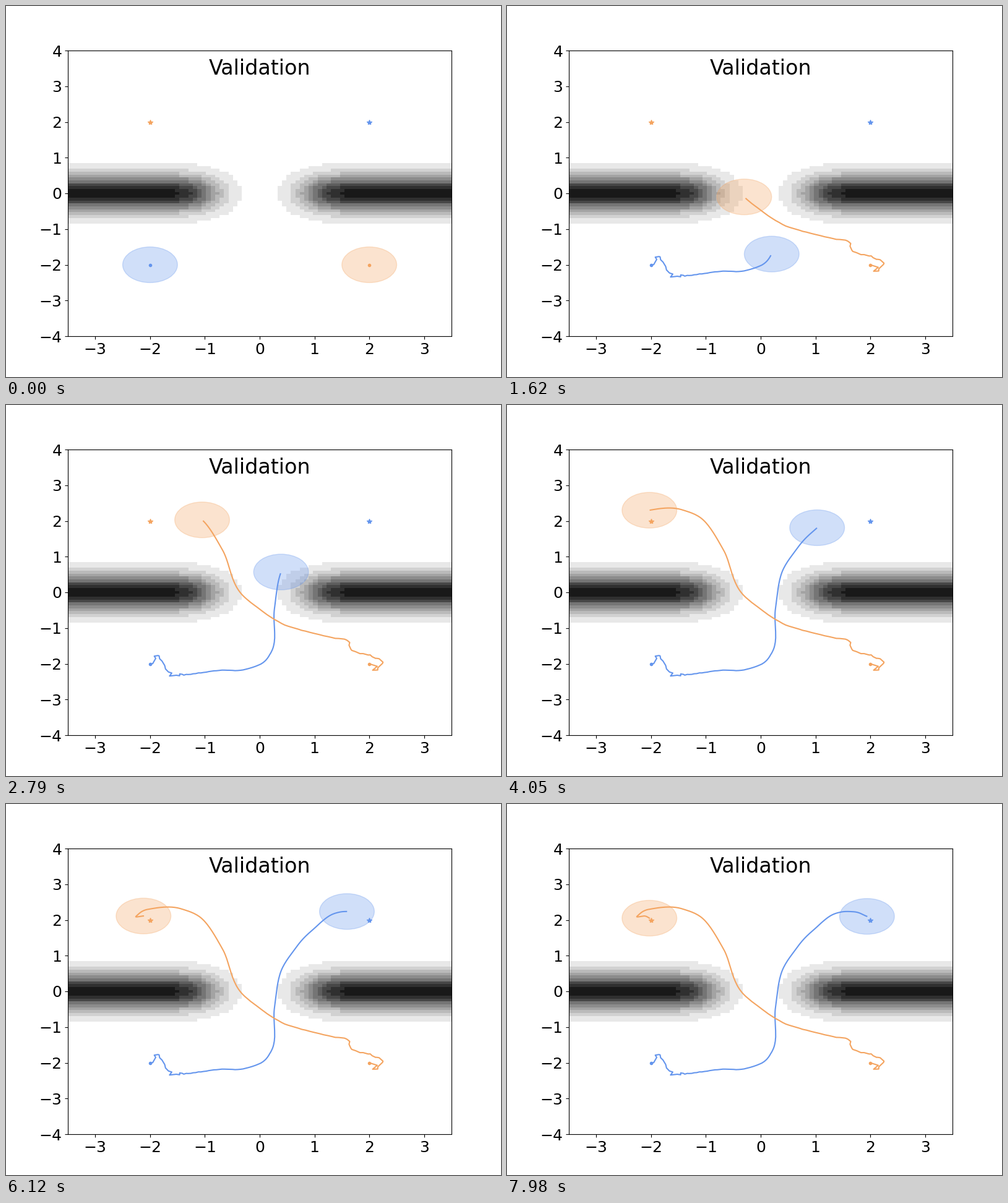
These frames come from a looping animation (800 by 600 pixels, 8 s). A matplotlib script:

```python
import math
import numpy as np
import matplotlib.pyplot as plt
from matplotlib.animation import FuncAnimation
from matplotlib.patches import Circle

LOOP, FRAMES, STEP = 8000, 320, 30
INTERVAL = LOOP // FRAMES
LAST = 266

# Key poses of each agent: (step, x, y).
BLUE = [
    (0, -2, -2), (4, -1.87, -1.78), (11, -1.63, -2.28), (18, -1.38, -2.3),
    (33, -0.69, -2.18), (41, -0.3, -2.17), (48, 0.06, -1.97),
    (54, 0.2, -1.7), (76, 0.27, -0.45), (93, 0.39, 0.57),
    (108, 0.66, 1.22), (135, 1.03, 1.81), (189, 1.46, 2.22),
    (216, 1.69, 2.23), (LAST, 1.94, 2.1),
]
ORANGE = [
    (0, 2, -2), (2, 2.13, -2.18), (6, 2.24, -1.97), (11, 2.01, -1.75),
    (17, 1.66, -1.6), (21, 1.62, -1.36), (27, 1.32, -1.27),
    (33, 0.84, -1.09), (40, 0.4, -0.87), (48, -0.08, -0.38),
    (54, -0.3, -0.1), (76, -0.68, 1.19), (93, -1.05, 2.03),
    (108, -1.43, 2.31), (135, -2.03, 2.3), (162, -2.25, 2.11),
    (204, -2.12, 2.11), (LAST, -2.03, 2.05),
]


def glide(keys):
    """Cubic Hermite path through the key poses, one row per step."""
    keys = np.array(keys, float)
    knots, pos = keys[:, 0], keys[:, 1:]
    slope = np.gradient(pos, knots, axis=0)
    t = np.arange(LAST + 1)
    i = np.clip(np.searchsorted(knots, t, side="right") - 1, 0, len(knots) - 2)
    h = (knots[i + 1] - knots[i])[:, None]
    u = (t - knots[i])[:, None] / h
    return ((1 + 2 * u) * (1 - u) ** 2 * pos[i]
            + u * (1 - u) ** 2 * h * slope[i]
            + u * u * (3 - 2 * u) * pos[i + 1]
            + u * u * (u - 1) * h * slope[i + 1])


def jitter(seed, size=0.05, decay=12):
    """Random shake that dies out; the starting point stays exact."""
    t = np.arange(LAST + 1)[:, None]
    noise = np.random.default_rng(seed).normal(size=(LAST + 1, 2))
    return size * np.sign(t) * np.exp(-t / decay) * noise


def wall_image(cols=86, rows=99, sigma=0.345, edge=0.9):
    """Two soft walls with a gap between them, in eleven greys."""
    x = (np.arange(cols) + 0.5) * 7 / cols - 3.5
    y = (np.arange(rows) + 0.5) * 8 / rows - 4
    along = [0.5 * (1 + math.erf((abs(v) - edge) / sigma / math.sqrt(2)))
             for v in x]
    across = np.exp(-0.5 * (y / sigma) ** 2)
    return 1 - 0.09 * np.round(10 * np.outer(across, along))


class Agent:
    def __init__(self, ax, color, keys, goal, seed):
        self.path = glide(keys) + jitter(seed)
        self.disc = Circle(self.path[0], 0.5, color=color, alpha=0.3)
        ax.add_patch(self.disc)
        ax.plot(*self.path[0], ".", color=color, ms=6)
        ax.plot(*goal, "*", color=color, ms=6)
        self.trail, = ax.plot([], [], color=color, lw=1.5)

    def show(self, step):
        self.disc.center = self.path[step]
        self.trail.set_data(*self.path[:step].T)
        return self.disc, self.trail


fig, ax = plt.subplots(figsize=(8, 6), dpi=100)
ax.imshow(wall_image(), cmap="gray", vmin=0, vmax=1, aspect="auto",
          extent=(-3.5, 3.5, -4, 4), interpolation="nearest")
ax.set(xlim=(-3.5, 3.5), ylim=(-4, 4), xticks=range(-3, 4), yticks=range(-4, 5))
ax.tick_params(labelsize=18)
ax.set_title("Validation", fontsize=24, y=1.0, pad=-28)

agents = [
    Agent(ax, "cornflowerblue", BLUE, (2, 2), seed=1),
    Agent(ax, "sandybrown", ORANGE, (-2, 2), seed=4),
]


def update(frame):
    step = min(math.ceil(frame * INTERVAL / STEP), LAST)
    return [artist for agent in agents for artist in agent.show(step)]


def reset():
    return update(0)


anim = FuncAnimation(fig, update, frames=FRAMES, init_func=reset,
                     interval=INTERVAL, repeat=True, repeat_delay=0, blit=False)
plt.show()
```
